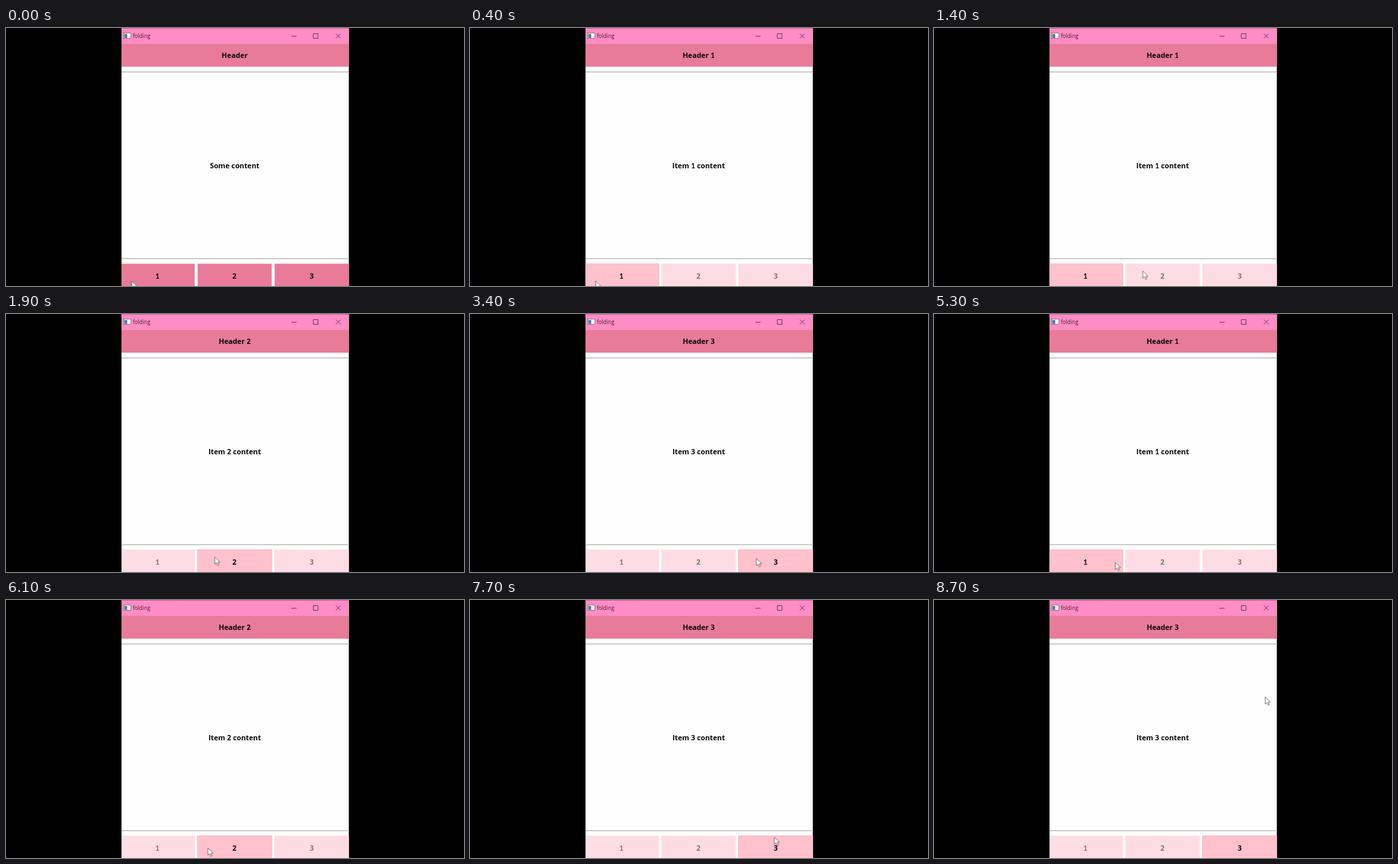
These frames come from a looping animation (690x388 px, 8800 ms). An HTML page:

```html
<!DOCTYPE html>
<html lang="en">
<head>
<meta charset="utf-8">
<title>Tab window</title>
<style>
  html, body { margin: 0; width: 100%; height: 100%; overflow: hidden; background: #000; }
  svg { display: block; width: 690px; height: 388px; }

  text { font: 700 10.8px "Open Sans", "Noto Sans", sans-serif; text-anchor: middle; fill: #0b0709; }
  .one { font-family: Lato, sans-serif; }
  .title { font-weight: 400; font-size: 8.2px; text-anchor: start; fill: #4a2038; }
  .glyph { fill: none; stroke: #63304c; stroke-width: .9; }
  .rose { fill: #e87a9a; }
  .off rect { fill: #fedce6; }
  .off text { fill: #857078; }
  .on rect { fill: #ffc1cc; stroke: #dfb1bc; stroke-width: .5; }

  /* hard cuts on one shared 8.8 s clock */
  .idle, .first, .second, .third, .cursor { animation: 8.8s step-end infinite; }
  .idle { animation-name: idle; }
  .first { animation-name: first; }
  .second { animation-name: second; }
  .third { animation-name: third; }
  .cursor { animation-name: point; }

  @keyframes idle {
    0% { visibility: visible; }
    4.545% { visibility: hidden; }
  }
  @keyframes first {
    0%, 21.59%, 68.181% { visibility: hidden; }
    4.545%, 60.227% { visibility: visible; }
  }
  @keyframes second {
    0%, 38.636%, 87.5% { visibility: hidden; }
    21.59%, 68.181% { visibility: visible; }
  }
  @keyframes third {
    0%, 60.227% { visibility: hidden; }
    38.636%, 87.5% { visibility: visible; }
  }
  @keyframes point {
    0% { transform: translate(189.4px, 380.4px); }
    11.363% { transform: translate(218px, 369px); }
    12.499% { transform: translate(264px, 364px); }
    13.636% { transform: translate(297px, 370.5px); }
    15.909% { transform: translate(314.6px, 365.4px); }
    26.136% { transform: translate(415.4px, 366.6px); }
    32.954% { transform: translate(425px, 367.4px); }
    34.09% { transform: translate(431.5px, 367.4px); }
    49.999% { transform: translate(412px, 369px); }
    51.136% { transform: translate(355px, 372px); }
    52.272% { transform: translate(297px, 373.4px); }
    53.409% { transform: translate(273.2px, 373.4px); }
    63.636% { transform: translate(292px, 373.2px); }
    64.772% { transform: translate(304.2px, 372.8px); }
    72.727% { transform: translate(452.2px, 352.6px); }
    74.999% { transform: translate(463px, 348px); }
    76.136% { transform: translate(468.5px, 345.6px); }
    79.545% { transform: translate(458.5px, 356.6px); }
    93.181% { transform: translate(432px, 357.4px); }
    97.727% { transform: translate(469.5px, 192px); }
    98.863% { transform: translate(499px, 145.6px); }
  }
</style>
</head>
<body>
<svg viewBox="0 0 690 388">
  <rect width="690" height="388"/>
  <rect x="174" width="342.5" height="388" fill="#fefefe"/>

  <!-- title bar -->
  <rect x="174" width="342.5" height="23.3" fill="#ff8cc5"/>
  <rect x="174" width="342.5" height=".7" fill="#a95881"/>
  <rect x="177.5" y="7.5" width="10.5" height="8" fill="#f8f5f8" stroke="#7d566e" stroke-width=".7"/>
  <rect x="178.5" y="9" width="4" height="5.8" fill="#3c7f86"/>
  <text class="title" x="191" y="15">folding</text>
  <path class="glyph" d="M430 12.3h7.5M463 8.5h7v7h-7zM497 8.5l7 7M504 8.5l-7 7"/>

  <!-- header and separators -->
  <rect class="rose" x="174" y="23.3" width="342.5" height="34.9"/>
  <rect x="174" y="65.3" width="342.5" height="1.7" fill="#c8c6c8"/>
  <rect x="174" y="346" width="342.5" height="1.7" fill="#c8c6c8"/>

  <g class="idle">
    <text x="344.5" y="45">Header</text>
    <text x="344.5" y="211.3">Some content</text>
    <rect class="rose" x="174" y="354.5" width="110.3" height="34"/>
    <rect class="rose" x="288.7" y="354.5" width="111.6" height="34"/>
    <rect class="rose" x="404.7" y="354.5" width="111.8" height="34"/>
    <text class="one" x="228.2" y="376.8">1</text>
    <text x="344" y="376.8">2</text>
    <text x="460.5" y="376.8">3</text>
  </g>

  <defs>
    <g id="tab1"><rect x="174" y="354.4" width="110.6" height="35"/><text class="one" x="228.2" y="376.8">1</text></g>
    <g id="tab2"><rect x="288.2" y="354.4" width="112.4" height="35"/><text x="344" y="376.8">2</text></g>
    <g id="tab3"><rect x="404.2" y="354.4" width="112.2" height="35"/><text x="460.5" y="376.8">3</text></g>
  </defs>

  <g class="first">
    <text x="344.5" y="45">Header <tspan class="one">1</tspan></text>
    <text x="344.5" y="211.3">Item <tspan class="one">1</tspan> content</text>
    <g class="on"><rect x="174" y="354.4" width="110.6" height="35"/><text class="one" x="228.2" y="376.8">1</text></g>
    <g class="off"><rect x="288.2" y="354.4" width="112.4" height="35"/><text x="344" y="376.8">2</text></g>
    <g class="off"><rect x="404.2" y="354.4" width="112.2" height="35"/><text x="460.5" y="376.8">3</text></g>
  </g>

  <g class="second">
    <text x="344.5" y="45">Header 2</text>
    <text x="344.5" y="211.3">Item 2 content</text>
    <g class="off"><rect x="174" y="354.4" width="110.6" height="35"/><text class="one" x="228.2" y="376.8">1</text></g>
    <g class="on"><rect x="288.2" y="354.4" width="112.4" height="35"/><text x="344" y="376.8">2</text></g>
    <g class="off"><rect x="404.2" y="354.4" width="112.2" height="35"/><text x="460.5" y="376.8">3</text></g>
  </g>

  <g class="third">
    <text x="344.5" y="45">Header 3</text>
    <text x="344.5" y="211.3">Item 3 content</text>
    <g class="off"><rect x="174" y="354.4" width="110.6" height="35"/><text class="one" x="228.2" y="376.8">1</text></g>
    <g class="off"><rect x="288.2" y="354.4" width="112.4" height="35"/><text x="344" y="376.8">2</text></g>
    <g class="on"><rect x="404.2" y="354.4" width="112.2" height="35"/><text x="460.5" y="376.8">3</text></g>
  </g>

  <path class="cursor" d="M0 0V11L2.5 8.7L4.3 12.7L6.1 11.9L4.4 8H7.8Z" fill="#fff" stroke="#4c4549" stroke-width=".75" stroke-linejoin="round"/>
</svg>
</body>
</html>
```
